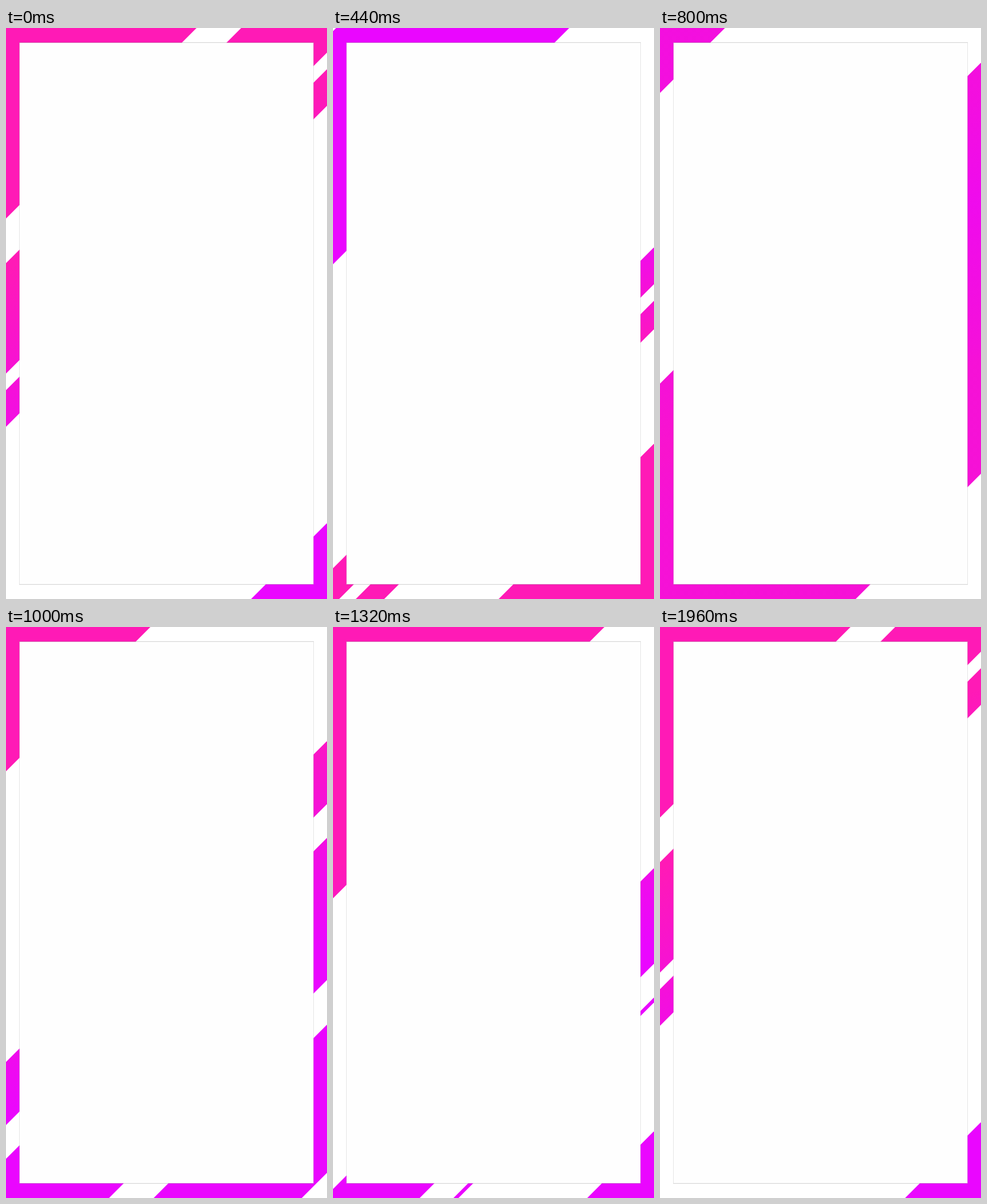
Write an HTML page with a canvas that moves like this. It is 561 by 998 pixels and loops after 2 s.

```html
<!DOCTYPE html>
<html lang="en">
<head>
<meta charset="utf-8">
<title>Striped frame</title>
<style>
  html, body { margin: 0; width: 100%; height: 100%; overflow: hidden; background: #fff; }
  canvas { display: block; }
</style>
</head>
<body>
<canvas id="stage" width="561" height="998"></canvas>
<script>
const W = 561, H = 998, STEP = 40, LOOP = 2000, LAST = 49;
const PINK = '#ff1ab6', PURPLE = '#ea06ff';
const ctx = document.getElementById('stage').getContext('2d');

const clamp = v => Math.max(0, Math.min(1, v));
const glide = (from, to, t0, t1, n) => from + (to - from) * clamp((n - t0) / (t1 - t0));

// Leaves home, reverses at the given step and is back home at the end.
const bounce = (home, away, turn) => n =>
  n < turn ? glide(home, away, 0, turn, n) : glide(away, home, turn, LAST, n);

// Diagonal gaps; their place is measured along x + y.
const gaps = [
  { width: 508, place: bounce(918.3, 85.8, 19) },
  { width: 200, place: bounce(697, 1549, 24) },
  { width: 78, place: bounce(333, 1495, 16) },
  { width: 29, place: bounce(604, 1524, 25) },
  { width: 29, place: bounce(1055, 121, 16) },
  { width: 59, place: n => n < 11 ? glide(877, -54, 0, 11, n) : bounceBack(n) }
];

function bounceBack(n) {
  const top = 1200.5, turn = 30;
  return n < turn ? top - 66 * (turn - n) : top - 17 * (n - turn);
}

// Colour ramp over y + slope * x, running between two heights.
function ramp(slope, from, to, first, second) {
  const k = 1 / (1 + slope * slope);
  const fill = ctx.createLinearGradient(from * slope * k, from * k, to * slope * k, to * k);
  fill.addColorStop(0, first);
  fill.addColorStop(1, second);
  return fill;
}

const dayFill = ramp(W / H, 420, 867, PINK, PURPLE);
const swapFill = ramp(0.29, 465, 745, PURPLE, PINK);

function drawColours(n) {
  const swap = n < 14 ? glide(0, 1, 0, 11, n) : glide(1, 0, 16, 25, n);
  ctx.fillStyle = dayFill;
  ctx.fillRect(0, 0, W, H);
  ctx.globalAlpha = swap;
  ctx.fillStyle = swapFill;
  ctx.fillRect(0, 0, W, H);
  ctx.globalAlpha = 1;
}

function drawGap(start, width) {
  ctx.beginPath();
  ctx.moveTo(start, 0);
  ctx.lineTo(start + width, 0);
  ctx.lineTo(start + width - H, H);
  ctx.lineTo(start - H, H);
  ctx.fill();
}

function drawPanel() {
  const x = 23, y = 25, w = 515, h = 948;
  ctx.fillStyle = 'rgba(205, 205, 205, .5)';
  ctx.fillRect(x, y + 1, w, h - 2);
  ctx.fillStyle = 'rgba(165, 165, 165, .5)';
  ctx.fillRect(x, y, w, 1);
  ctx.fillRect(x, y + h - 1, w, 1);
  ctx.fillStyle = '#fefefe';
  ctx.fillRect(x + 1, y + 1, w - 2, h - 2);
}

function draw(n) {
  drawColours(n);
  ctx.fillStyle = '#fff';
  for (const { width, place } of gaps) drawGap(place(n), width);
  drawPanel();
}

function tick() {
  draw(Math.floor(performance.now() % LOOP / STEP));
  requestAnimationFrame(tick);
}
tick();
</script>
</body>
</html>
```
